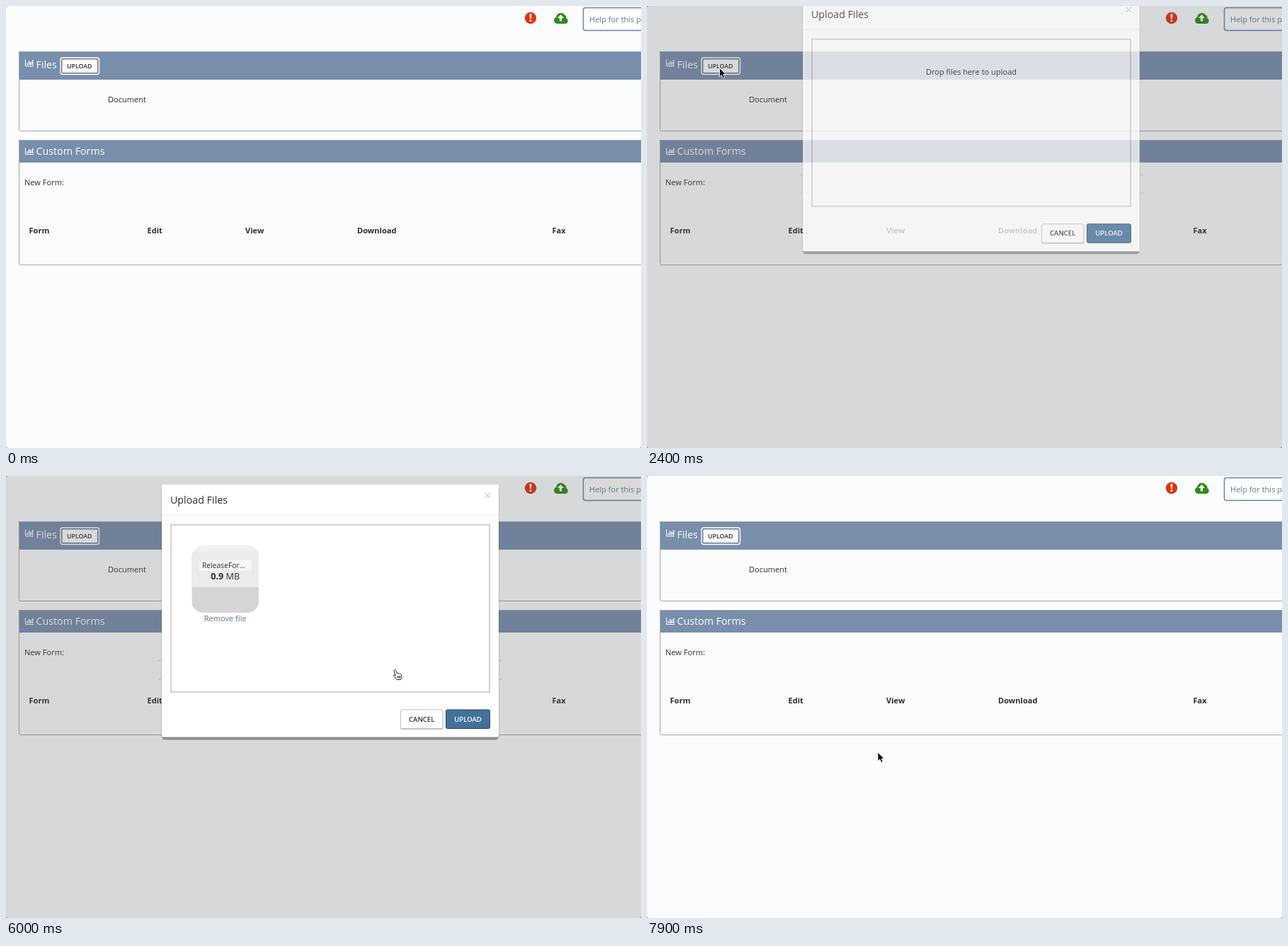
An HTML page for the animation above (8000 ms loop, 897 by 624 pixels).

```html
<!DOCTYPE html>
<html lang="en">
<head>
<meta charset="utf-8">
<title>Upload files</title>
<style>
  html, body { margin: 0; width: 100%; height: 100%; overflow: hidden; background: #fbfcfe; }
  svg { display: block; width: 897px; height: 624px; }
  text { font: 11.07px "Open Sans", sans-serif; fill: #2b2d30; white-space: pre; }
  .title { font-size: 14.25px; }
  .bar { fill: #788eab; }
  .bar-text { fill: #fff; }
  .bold { font-weight: 700; }
  .btn { font-size: 9.5px; font-weight: 600; }
  .small { font-size: 8.75px; font-weight: 600; }
  .mid { text-anchor: middle; }
  .edge { fill: none; stroke: #a3a6ab; }
</style>
</head>
<body>
<svg viewBox="0 0 897 624">
  <defs>
    <g id="chart" fill="none" stroke="#fff">
      <path d="M.5 0V9.5H12" />
      <path d="M3.2 8V5M5.7 8V2M8.2 8V3.5M10.6 8V.8" stroke-width="1.5" />
    </g>
    <clipPath id="thumb"><rect x="262.5" y="98.5" width="94.5" height="94.5" rx="16" /></clipPath>
  </defs>

  <rect id="body" width="897" height="624" fill="#fbfcfe" />
  <g id="light">
    <path fill="#fff" d="M0 0H897V47.500H0ZM19 104H897V176H19ZM19 221H897V365H19Z" />
    <path d="M0 47.500H897" stroke="#eaeaec" />
    <rect x="26.500" y="260.500" width="900" height="26" rx="3" fill="none" stroke="#c9cbd0" />
    <path d="M26 302.500H897" stroke="#e4e5e8" />
  </g>

  <circle cx="741" cy="17" r="8.200" fill="#e2330f" />
  <path d="M739.500 11h3l-.5 7h-2ZM739.700 19.600h2.600v2.500h-2.600Z" fill="#fff" />
  <path d="M778.500 25a4.800 4.800 0 0 1-1.200-9.300a6.600 6.600 0 0 1 12-3a3.400 3.400 0 0 1 1.900 4.300A4.200 4.200 0 0 1 790 25Z" fill="#2c8c17" />
  <path d="M783.500 12l4.600 5h-3v4.500h-3.200V17h-3Z" fill="#fff" />
  <rect x="815.500" y="2.500" width="100" height="32" rx="3" fill="#fff" stroke="#6385b0" stroke-width="1.500" />
  <text x="824" y="23" style="fill:#5d7896">Help for this page</text>

  <rect class="bar" x="18" y="64" width="880" height="40" />
  <rect class="edge" x="18.500" y="64.500" width="900" height="112" rx="2" />
  <use href="#chart" x="27" y="75.500" />
  <text class="title bar-text" x="42.500" y="88">Files</text>
  <rect x="77" y="73" width="54.500" height="23.500" rx="3" fill="#788eab" stroke="#fff" stroke-width="1.400" />
  <rect x="79" y="75" width="50.500" height="19.500" rx="1.500" fill="#fcfcfd" stroke="#5e6b7d" stroke-width=".8" />
  <text class="small mid" x="103.800" y="87.800">UPLOAD</text>
  <text x="144" y="136">Document</text>

  <rect class="bar" x="18" y="189" width="880" height="32" />
  <rect class="edge" x="18.500" y="189.500" width="900" height="176" rx="2" />
  <use href="#chart" x="27" y="200" />
  <text class="title bar-text" x="42.500" y="210">Custom Forms</text>
  <text x="26" y="252.500">New Form:</text>
  <g id="columns"></g>
  <path d="M0 0h2L0 2ZM0 624v-2l2 2ZM897 624v-2l-2 2Z" fill="#999" />

  <rect id="dim" width="897" height="624" fill="#505054" fill-opacity=".21" />

  <g id="modal">
    <path d="M215 260.500H701M215 286.500H701" stroke="#b4b6ba" />
    <rect x="219" y="16" width="478" height="354" rx="4" fill="#000" opacity=".12" />
    <rect x="220.500" y="20" width="475" height="352.500" rx="4" fill="#8d8e91" />
    <rect x="220" y="12" width="476" height="356.500" rx="2" fill="#fff" />
    <path d="M220 55.500H696" stroke="#efefef" />
    <text class="title" x="232" y="39">Upload Files</text>
    <path d="M676.700 24l7 7M683.700 24l-7 7" stroke="#cdcdcd" stroke-width="1.200" />
    <rect x="233" y="69" width="450" height="236" fill="#fff" stroke="#cfcfd0" stroke-width="1.800" />
    <text id="hint" class="mid" x="458" y="119.500">Drop files here to upload</text>
    <g id="file">
      <g clip-path="url(#thumb)">
        <rect x="262" y="98" width="96" height="96" fill="#d5d5d7" />
        <rect x="262" y="98" width="96" height="59" fill="#ebebec" />
        <rect x="262" y="98" width="96" height="8" fill="#f1f1f1" />
      </g>
      <rect x="273" y="118.500" width="74" height="15.500" rx="2" fill="#f6f6f6" />
      <text x="277" y="130" style="font-size:10.3px">ReleaseFor…</text>
      <text class="mid" x="309.700" y="146" style="font-size:12.65px"><tspan class="bold">0.9</tspan> MB</text>
      <text class="mid" x="309.700" y="205" style="fill:#587596">Remove file</text>
    </g>
    <rect x="557" y="331" width="60.500" height="27" rx="2" fill="#c8c8c8" />
    <rect x="557.500" y="330" width="59.500" height="26.500" rx="2" fill="#fff" stroke="#bfc0c2" />
    <text class="btn mid" x="587.200" y="346.700">CANCEL</text>
    <rect x="621.500" y="330" width="62" height="26.500" rx="2" fill="#44709c" stroke="#2c4765" />
    <text class="btn mid bar-text" x="652.500" y="346.700">UPLOAD</text>
  </g>

  <circle id="ring" r="19" fill="#fff" fill-opacity=".15" stroke="#1c1f24" stroke-width="1.400" />
  <g id="cursor" stroke-linejoin="round">
    <path id="arrow" d="M0 0V12.500L2.900 9.900L5 14.500L7.200 13.500L5.200 9.100H9Z" fill="#000" stroke="#fff" stroke-width=".9" />
    <path id="hand" d="M1 0C2.300-.5 3 .6 3.300 1.800L4.200 4.500C5 3.800 6 4.200 6.300 4.900C7.200 4.300 8 4.700 8.400 5.400C9.500 4.900 10.300 5.500 10.500 6.500L11 9.500C11 11 10.300 12 9.700 13.500H4.300C3.300 11.500 1.500 10.500-.5 8.500C-1.200 7.300 0 6.500 1.200 7.200L2.300 8L.1 1.700C-.2.900.2.200 1 0ZM5 8.500L5.600 11.500M6.900 8.200L7.300 11.500M8.700 8.200L8.900 11.500" fill="#fff" stroke="#222" />
  </g>
</svg>
<script>
  const LOOP = 8000, STEP = 100;
  const $ = id => document.getElementById(id);
  const show = (id, on) => { $(id).style.display = on ? "" : "none"; };
  const ramp = (t, a, b) => Math.min(1, Math.max(0, (t - a) / (b - a)));
  const smooth = u => u * u * (3 - 2 * u);
  const within = (t, a, b) => t >= a && t < b;

  const columns = { Form: 32.5, Edit: 199.5, View: 338, Download: 496, Fax: 771.5 };
  $("columns").innerHTML = Object.entries(columns)
    .map(([name, x]) => `<text class="bold" x="${x}" y="320.7">${name}</text>`).join("");

  // time, x, y
  const path = [
    [500, 430, 552], [1100, 97, 89], [1300, 97, 89], [1600, 102.5, 87.5],
    [2400, 102.5, 87.5], [2900, 330, 640], [4900, 900, 200], [5400, 470, 190],
    [5700, 470, 190], [6000, 548, 274], [6300, 638, 342], [7200, 638, 342],
    [7500, 452, 372], [7900, 326, 390]
  ];
  const clicks = [[1200, 1400], [6400, 6600]];

  function cursorAt(t) {
    const i = path.findIndex(p => p[0] > t);
    if (i < 1) return path[i < 0 ? path.length - 1 : 0].slice(1);
    const [t0, x0, y0] = path[i - 1], [t1, x1, y1] = path[i];
    const u = smooth(ramp(t, t0, t1));
    return [x0 + (x1 - x0) * u, y0 + (y1 - y0) * u];
  }

  function draw(t) {
    const flash = within(t, 2100, 2300);
    show("light", flash);
    $("body").setAttribute("fill", flash ? "#f5f5fb" : "#fbfcfe");
    $("dim").style.opacity = 0.82 * ramp(t, 2000, 2200) + 0.18 * ramp(t, 2200, 2300) - ramp(t, 6800, 7000);

    const enter = 1 - (1 - ramp(t, 2200, 2600)) ** 2;
    const leave = ramp(t, 6500, 6800);
    $("modal").style.opacity = enter * (1 - leave);
    $("modal").setAttribute("transform", `translate(0 ${-89 * (1 - enter + leave * leave)})`);
    show("modal", within(t, 2300, 6800));
    show("file", t >= 5400);
    show("hint", t < 5400);

    const [x, y] = cursorAt(t);
    const hand = within(t, 5500, 6200);
    show("cursor", within(t, 500, 2900) || t >= 4900);
    show("hand", hand);
    show("arrow", !hand);
    $("cursor").setAttribute("transform", `translate(${x} ${y})`);
    show("ring", clicks.some(([a, b]) => within(t, a, b)));
    $("ring").setAttribute("transform", `translate(${x} ${y})`);
  }

  const start = performance.now();
  function tick() {
    const t = (performance.now() - start) % LOOP;
    draw(Math.floor(t / STEP) * STEP);
    requestAnimationFrame(tick);
  }
  draw(0);
  requestAnimationFrame(tick);
</script>
</body>
</html>
```
